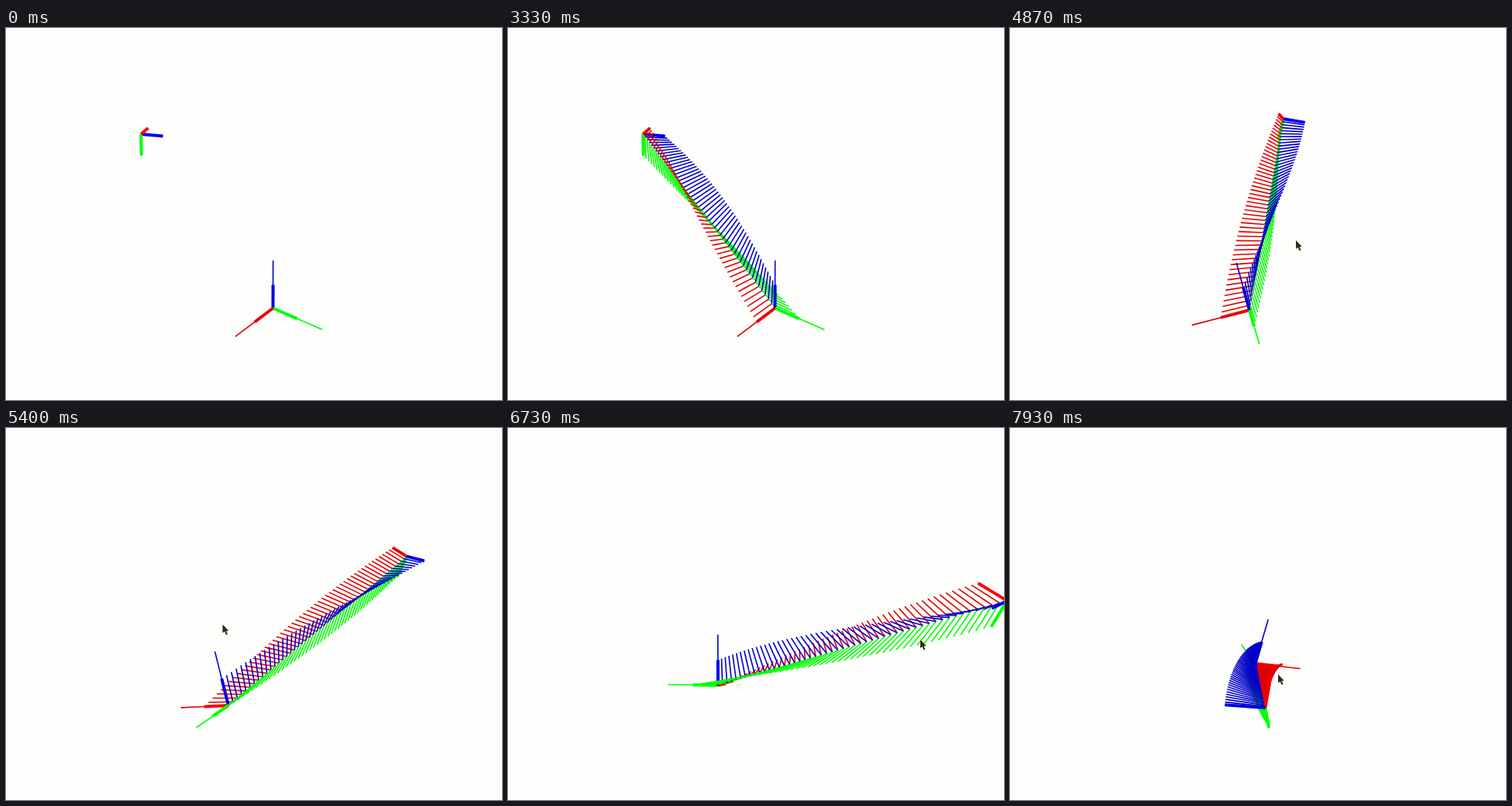
Write an HTML page that moves like this. It is 640 by 480 pixels and loops after 8 s.

```html
<!DOCTYPE html>
<html lang="en">
<head>
<meta charset="utf-8">
<title>Pose interpolation</title>
<style>
  html, body { margin: 0; width: 100%; height: 100%; overflow: hidden; background: #fdfdfc; }
  svg { display: block; width: 640px; height: 480px; }
</style>
</head>
<body>
<svg viewBox="0 0 640 480">
  <g id="lines"></g>
  <path id="cursor" d="M0 0V11L2.5 9L4.6 13.4L6.4 12.6L4.5 8.4L7.6 8Z"
        fill="#2a2a18" stroke="#f4f4c8" stroke-width="1" paint-order="stroke"/>
</svg>
<script>
const LOOP = 8000, STEP = 200 / 3, START = 70, COUNT = 50;
const FX = 915, FY = 872, CX = 320, CY = 240;
const PIVOT = [-0.6, -1.2, 1.3], DISTANCE = 12.45;
const GOAL = { pos: [-1.9, -5, 1.5], axis: [-0.653, -0.739, 0.165], angle: 106.7 };
const BASIS = [[1, 0, 0], [0, 1, 0], [0, 0, 1]];
const BOLD = { width: 4, colors: ['#f00', '#0f0', '#0000f0'] };
const THIN = { width: 1.6, colors: ['#e00000', '#0f0', '#0000c8'] };

// Camera drags: angles in degrees, place of the origin and of the pointer on screen.
const POSES = [
  { step: 59, az: 38.6, el: 28.5, roll: 0.7, x: 344.5, y: 361.5, px: 385, py: 300 },
  { step: 64, az: 27, el: 44, roll: 4, x: 370, y: 357, px: 428, py: 330 },
  { step: 72, az: 86.5, el: 27, roll: 13.3, x: 309, y: 364, px: 369, py: 274 },
  { step: 88, az: 155.6, el: -8.6, roll: 12.4, x: 265, y: 352, px: 190, py: 233 },
  { step: 100, az: 195, el: -1.5, roll: 0.3, x: 271, y: 332, px: 532, py: 273 },
  { step: 118, az: 247.3, el: 16.8, roll: -15.3, x: 316.5, y: 304, px: 346, py: 318 }
];

const dot = (a, b) => a[0] * b[0] + a[1] * b[1] + a[2] * b[2];
const cross = (a, b) => [
  a[1] * b[2] - a[2] * b[1],
  a[2] * b[0] - a[0] * b[2],
  a[0] * b[1] - a[1] * b[0]
];
const sinCos = deg => [Math.sin(deg * Math.PI / 180), Math.cos(deg * Math.PI / 180)];

function rotate(v, axis, deg) {
  const [s, c] = sinCos(deg);
  const w = cross(axis, v), k = dot(axis, v) * (1 - c);
  return v.map((n, i) => n * c + w[i] * s + axis[i] * k);
}

// Each segment shows once "born" steps have passed.
const segments = [];
function addFrame(s, size, { width, colors }, born = 0) {
  const from = GOAL.pos.map(p => p * s);
  BASIS.forEach((e, i) => {
    const dir = rotate(e, GOAL.axis, GOAL.angle * s);
    const to = from.map((p, j) => p + dir[j] * size);
    segments.push({ from, to, color: colors[i], width, born });
  });
}
addFrame(0, 1, THIN);
addFrame(0, 0.5, BOLD);
addFrame(1, 0.5, BOLD);
for (let i = 1; i <= COUNT; i++) addFrame(i / COUNT, 0.5, THIN, i);

const group = document.getElementById('lines');
const cursor = document.getElementById('cursor');
const pool = segments.map(() =>
  group.appendChild(document.createElementNS('http://www.w3.org/2000/svg', 'line')));

function poseAt(step) {
  const next = POSES.findIndex(p => p.step > step);
  if (next === 0) return POSES[0];
  if (next < 0) return POSES[POSES.length - 1];
  const a = POSES[next - 1], b = POSES[next];
  const u = (step - a.step) / (b.step - a.step);
  const pose = {};
  for (const k in a) pose[k] = a[k] + (b[k] - a[k]) * u;
  return pose;
}

function projector({ az, el, roll, x, y }) {
  const [sa, ca] = sinCos(az), [se, ce] = sinCos(el), [sr, cr] = sinCos(roll);
  const right = [-sa, ca, 0];
  const down = [ca * se, sa * se, -ce];
  const ahead = [-ca * ce, -sa * ce, -se];
  const depth = DISTANCE - dot(PIVOT, ahead);
  const x0 = (x - CX) / FX * depth, y0 = (y - CY) / FY * depth;
  return p => {
    const u = dot(p, right), v = dot(p, down), d = depth + dot(p, ahead);
    return [
      CX + FX * (x0 + u * cr + v * sr) / d,
      CY + FY * (y0 - u * sr + v * cr) / d,
      d
    ];
  };
}

function render(t) {
  const step = Math.floor((t + 10 - START) / STEP);
  const pose = poseAt(step);
  const project = projector(pose);
  const shown = segments
    .filter(s => s.born <= step + 1)
    .map(s => ({ s, a: project(s.from), b: project(s.to) }))
    .sort((p, q) => q.a[2] + q.b[2] - p.a[2] - p.b[2]);

  pool.forEach((line, i) => {
    const item = shown[i];
    line.style.display = item ? '' : 'none';
    if (!item) return;
    const { s, a, b } = item;
    const attrs = {
      x1: a[0], y1: a[1], x2: b[0], y2: b[1],
      stroke: s.color, 'stroke-width': s.width
    };
    for (const k in attrs) line.setAttribute(k, attrs[k]);
  });

  cursor.style.display = step >= POSES[0].step ? '' : 'none';
  cursor.setAttribute('transform', `translate(${pose.px} ${pose.py})`);
}

const begin = performance.now();
function tick() {
  render((performance.now() - begin) % LOOP);
  requestAnimationFrame(tick);
}
tick();
</script>
</body>
</html>
```
